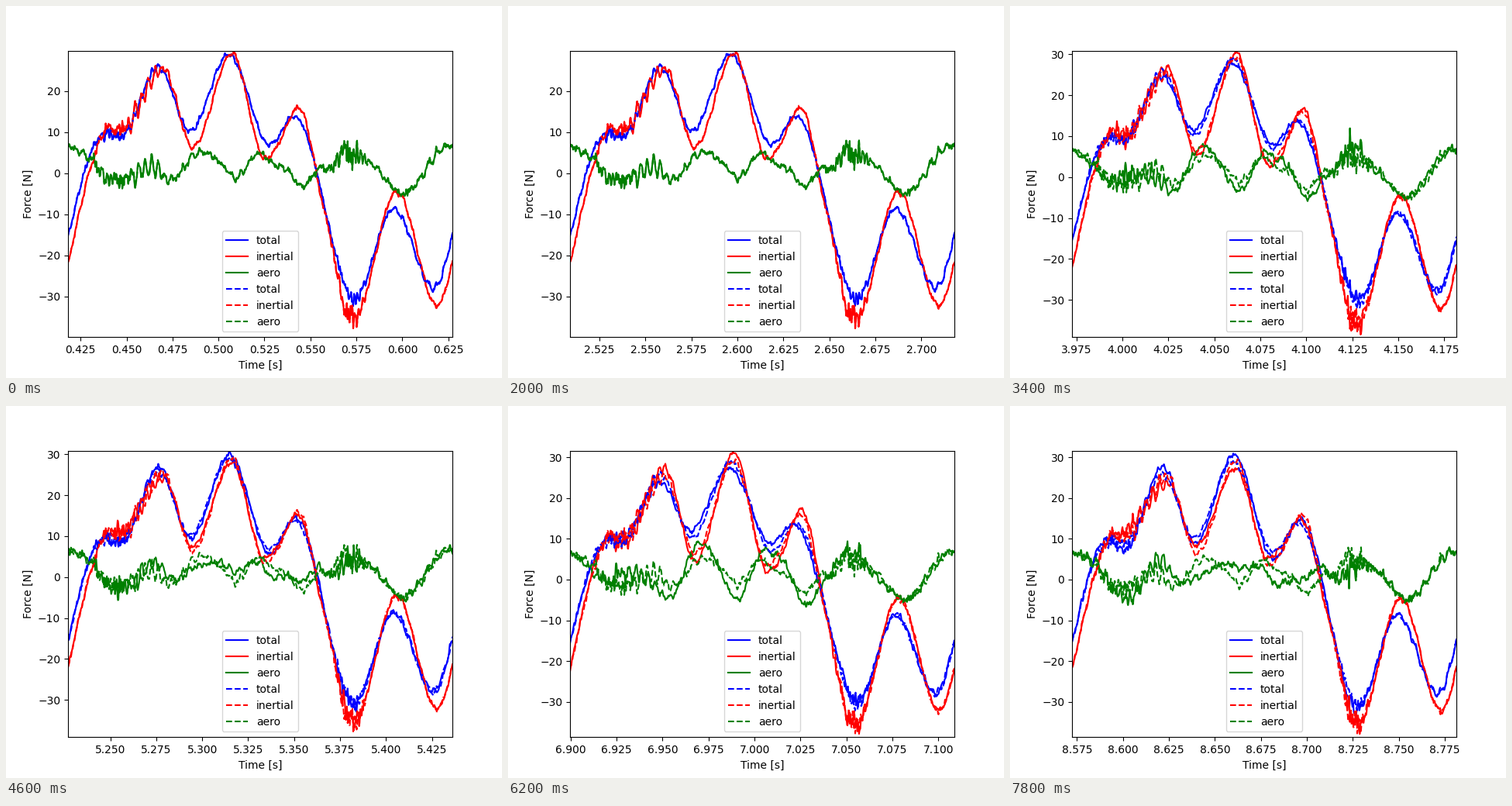
Animation of 640 by 480 pixels, one loop 8 s. Source, as a matplotlib script:

```python
import numpy as np
import matplotlib.pyplot as plt
from matplotlib.animation import FuncAnimation

PERIOD = 0.20908       # one wingbeat in seconds
FRAMES = 40
CYCLE = 10             # beats until the force pattern recurs
N = 900
u = np.linspace(0, 1, N)
wave = 2 * np.pi * u

# Turning points of one beat: (percent of beat, newtons)
TOTAL = [(-9.5, -40.7), (9.5, 9.6), (13.7, 9), (23.6, 25.8), (31.7, 10.4),
         (41.9, 28.9), (52.4, 6.9), (58.9, 14), (74.6, -30.5), (84.7, -8.7),
         (95.2, -28), (103.8, -6)]
INERTIAL = [(-8.5, -45), (10.9, 11), (13.5, 10.3), (24.8, 25.4), (32.5, 6.3),
            (42.7, 29.2), (51.2, 3.6), (54, 5.8), (59.9, 16), (66.9, -10),
            (74.2, -36), (85.5, -4.5), (96, -32.2), (104.6, -9)]


def curve(points):
    """Monotone cubic through the points, flat at every turn."""
    x, y = np.array(points, float).T
    x = x / 100
    h = np.diff(x)
    d = np.diff(y) / h
    slope = np.zeros(len(x))
    both = d[1:] * d[:-1]
    np.divide(2 * both, d[1:] + d[:-1], out=slope[1:-1], where=both > 0)
    k = np.searchsorted(x, u) - 1
    s = (u - x[k]) / h[k]
    ease = s * s * (3 - 2 * s)
    return (y[k] + (y[k + 1] - y[k]) * ease
            + h[k] * s * (1 - s) * (slope[k] * (1 - s) - slope[k + 1] * s))


def bump(center, width):
    return np.exp(-((u - center) / width) ** 2)


def jitter(rng):
    return np.convolve(rng.normal(size=N), [0.25, 0.5, 0.25], "same")


def ripple(rng, freq):
    return np.sin(freq * wave + rng.uniform(0, 2 * np.pi))


base_total, base_inertial = curve(TOTAL), curve(INERTIAL)
swing = (4.3 * np.exp(-((u - 0.42) / 0.36) ** 6)
         * np.cos(2 * np.pi * 5.15 * (u - 0.335)))
burst = 1.5 * bump(0.13, 0.05) + 2.4 * bump(0.73, 0.04)
ring = bump(0.2, 0.055)
tail = 0.3 + 0.4 * bump(0.95, 0.12)


def sway(i):
    return 0.95 * np.sin(0.6 * np.pi * i)


def forces(i):
    rng = np.random.default_rng(20 + i % CYCLE)
    own = np.random.default_rng(500 + i)
    shift = sway(i) * swing / 2
    total = (base_total + shift + (0.35 + 0.45 * burst) * jitter(rng)
             + 0.8 * ring * ripple(rng, 62) + tail * ripple(rng, 47)
             + 0.2 * jitter(own))
    inertial = (base_inertial - shift + (0.35 + burst) * jitter(rng)
                + 1.7 * ring * ripple(rng, 58) + 0.35 * ripple(rng, 39)
                + 0.2 * jitter(own))
    return total, inertial, total - inertial


fig, ax = plt.subplots(figsize=(6.4, 4.8), dpi=100)
names = ("total", "inertial", "aero")
solid = [ax.plot([], [], c + "-", label=n)[0] for c, n in zip("brg", names)]
dashed = [ax.plot([], [], c + "--", label=n)[0] for c, n in zip("brg", names)]
ax.set_xlabel("Time [s]")
ax.set_ylabel("Force [N]")
ax.legend(loc="lower center")
reference = forces(CYCLE * 5)


def update(i):
    start = (i + 2) * PERIOD
    t = start + PERIOD * u
    reach = abs(sway(i))
    low, high = -39.9 + 1.4 * reach, 29.8 + 2 * reach
    for line, y in zip(solid + dashed, forces(i) + reference):
        line.set_data(t, np.clip(y, low, high))
    ax.set_xlim(start, start + PERIOD)
    ax.set_ylim(low, high)
    return solid + dashed


anim = FuncAnimation(fig, update, frames=FRAMES, interval=200,
                     repeat=True, repeat_delay=0, blit=False)
plt.show()
```
